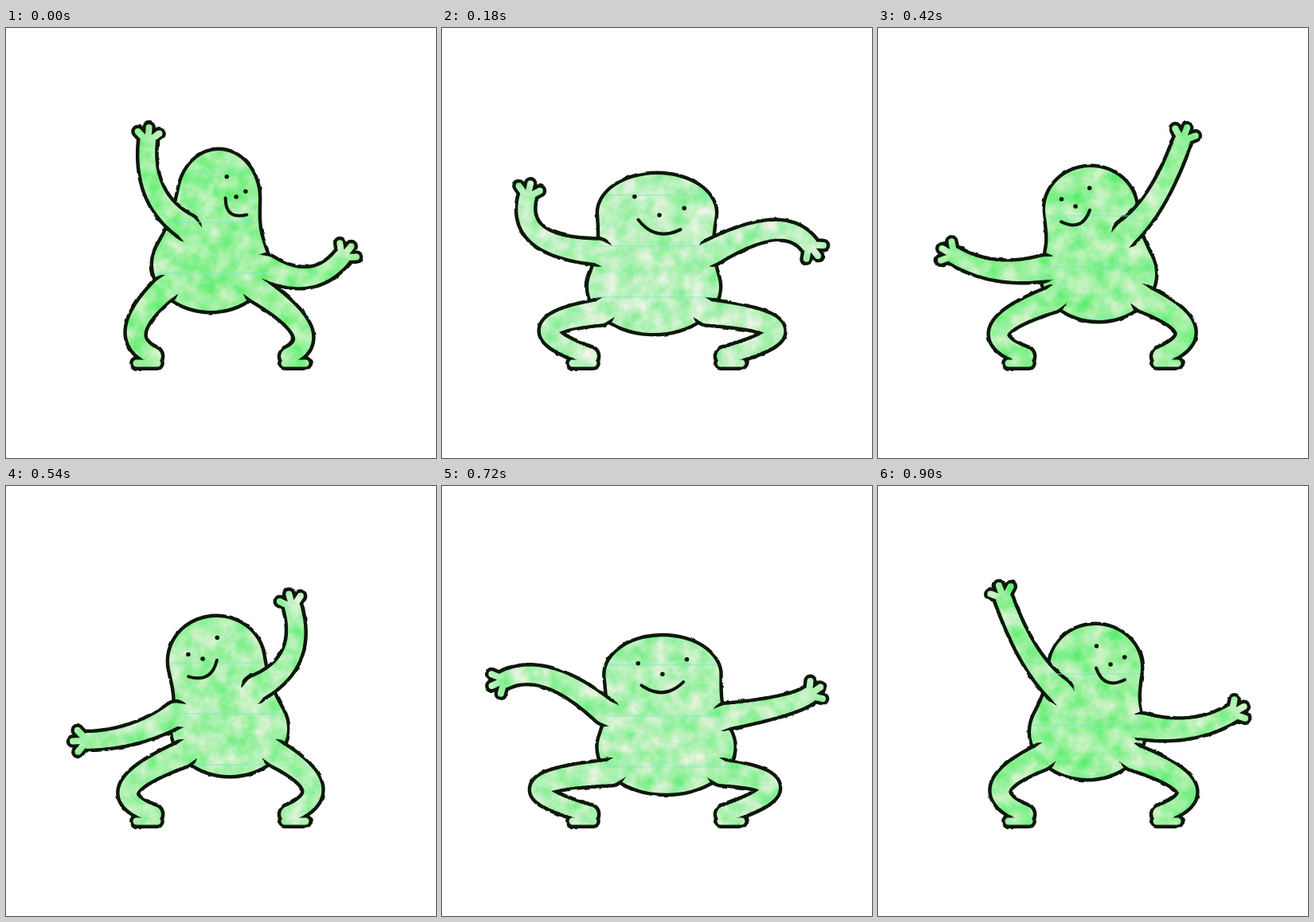
These frames come from a looping animation (540x540 px, 0.96 s). An HTML page:

```html
<!DOCTYPE html>
<html lang="en">
<head>
<meta charset="utf-8">
<title>Dancing blob</title>
<style>
  html, body { margin: 0; width: 100%; height: 100%; overflow: hidden; background: #fff; }
  svg { display: block; width: 100vw; height: 100vh; }
  .ink { fill: #0d180b; }
  .pen { fill: none; stroke: #0d180b; stroke-linecap: round; }
</style>
</head>
<body>
<svg viewBox="0 0 540 540">
  <defs>
    <filter id="marker" filterUnits="userSpaceOnUse" x="0" y="0" width="540" height="540" color-interpolation-filters="sRGB">
      <feTurbulence id="grain" type="fractalNoise" baseFrequency=".045" numOctaves="5"/>
      <feColorMatrix id="tint"/>
      <feComposite in2="SourceAlpha" operator="in"/>
    </filter>
    <filter id="rough" filterUnits="userSpaceOnUse" x="0" y="0" width="540" height="540" color-interpolation-filters="sRGB">
      <feTurbulence type="fractalNoise" baseFrequency=".08" numOctaves="2" result="noise"/>
      <feDisplacementMap in="SourceGraphic" in2="noise" scale="3" xChannelSelector="R" yChannelSelector="G"/>
    </filter>
    <clipPath id="inside"><path id="bodyClip"/></clipPath>
  </defs>
  <path id="bodyInk" class="ink" filter="url(#rough)"/>
  <path id="bodyFill" filter="url(#marker)"/>
  <path id="limbInk" class="ink" filter="url(#rough)"/>
  <path id="limbFill" filter="url(#marker)"/>
  <path id="rules" clip-path="url(#inside)" stroke="#7fe6cf" stroke-width="2" opacity=".45"/>
  <path id="smile" class="pen" stroke-width="4"/>
  <path id="dots" class="pen" stroke-width="5.5"/>
</svg>
<script>
const INK = 4.4, FOOT_Y = 421;
const $ = id => document.getElementById(id);

// head: x, y, rx, ry   belly: x, y, rx   face: x, y, tilt in degrees, half eye distance
// arms: shoulder, elbow, wrist   knees: left x, right x   paper: lightness, first ruled line
const reach = {
  head: [267, 214, 52, 62], belly: [257, 297, 74], face: [289, 196, 38, 15],
  armL: [227, 250, 187, 206, 178, 143], armR: [327, 301, 380, 313, 422, 288],
  knees: [163, 371], paper: [.25, 180]
};
const wave = {
  head: [264, 220, 61, 57], belly: [281, 305, 74], face: [247, 201, -30, 21],
  armL: [213, 287, 160, 311, 102, 320], armR: [314, 254, 358, 213, 360, 153],
  knees: [155, 385], paper: [.31, 222]
};
const squat = {
  head: [270, 232, 75, 50], belly: [266, 325, 84], face: [273, 219, 13, 32],
  armL: [196, 281, 122, 261, 107, 213], armR: [340, 281, 415, 254, 461, 272],
  knees: [135, 418], paper: [.37, 210]
};
const spread = {
  head: [258, 239, 69, 51], belly: [253, 326, 87], face: [255, 218, -4, 27],
  armL: [177, 295, 120, 288, 65, 303], armR: [328, 283, 385, 233, 450, 212],
  knees: [127, 408], paper: [.3, 240]
};
const point = {
  head: [273, 228, 59, 55], belly: [263, 309, 73], face: [292, 208, 22, 19],
  armL: [228, 257, 190, 211, 158, 142], armR: [333, 302, 392, 304, 444, 286],
  knees: [154, 387], paper: [.27, 236]
};

const flipX = ([x, ...rest]) => [540 - x, ...rest];
const flipArm = arm => arm.map((v, i) => i % 2 ? v : 540 - v);
function mirror(p) {
  const [x, y, tilt, half] = p.face;
  return {
    head: flipX(p.head), belly: flipX(p.belly), face: [540 - x, y, -tilt, half],
    armL: flipArm(p.armR), armR: flipArm(p.armL),
    knees: [540 - p.knees[1], 540 - p.knees[0]], paper: p.paper
  };
}

// Halfway between b and c on a cubic through four poses.
function between(a, b, c, d) {
  const mid = {};
  for (const key in b)
    mid[key] = b[key].map((v, i) => (9 * (v + c[key][i]) - a[key][i] - d[key][i]) / 16);
  return mid;
}

const waveL = mirror(wave), pointR = mirror(point);
const half = [
  reach, waveL, between(point, waveL, squat, spread), squat,
  between(waveL, squat, spread, pointR), spread, between(squat, spread, pointR, wave), pointR
];
const dance = [...half, ...half.map(mirror)];

const lerp = (a, b, t) => a + (b - a) * t;
const oval = (x, y, rx, ry = rx) =>
  `M${x - rx},${y}a${rx},${ry} 0 1 0 ${2 * rx},0a${rx},${ry} 0 1 0 ${-2 * rx},0`;

// Joins n + 1 ovals, each given by shape(t), into one blob.
const sweep = (n, shape) =>
  Array.from({ length: n + 1 }, (_, i) => oval(...shape(i / n))).join('');
const bar = (x1, y1, x2, y2, r) => sweep(10, t => [lerp(x1, x2, t), lerp(y1, y2, t), r]);

function torso({ head, belly }, grow) {
  const [x, y, rx, ry] = head;
  return sweep(24, t => {
    const waist = 1 - .08 * Math.sin(Math.PI * t);
    return [lerp(x, belly[0], t), lerp(y, belly[1], t),
      lerp(rx, belly[2], t) * waist - 2 + grow, lerp(ry, 60, t) - 2 + grow];
  });
}

// Tapering parabola through three joints.
const limb = ([ax, ay, bx, by, cx, cy], grow) => sweep(44, t => {
  const a = (1 - t) * (1 - 2 * t), b = 4 * t * (1 - t), c = t * (2 * t - 1);
  return [a * ax + b * bx + c * cx, a * ay + b * by + c * cy, 10 + 4.5 * (1 - t) ** 2 + grow];
});

function arm(joints, grow) {
  const [ax, ay, bx, by, x, y] = joints;
  const aim = Math.atan2(1.5 * y - 2 * by + ay / 2, 1.5 * x - 2 * bx + ax / 2);
  const fingers = [-.85, 0, .85].map(turn => {
    const [dx, dy] = [Math.cos(aim + turn), Math.sin(aim + turn)];
    return bar(x + 6 * dx, y + 6 * dy, x + 18 * dx, y + 18 * dy, 4 + grow);
  });
  return limb(joints, grow) + fingers.join('');
}

function leg([x, y, rx], knee, side, grow) {
  const heel = 270 + side * 80;
  return limb([x + side * rx * .8, y + 32, knee, 379, 270 + side * 85, 412], grow) +
    bar(heel, FOOT_Y, heel + side * 26, FOOT_Y, 4.5 + grow);
}

const limbs = (p, grow) => arm(p.armL, grow) + arm(p.armR, grow) +
  leg(p.belly, p.knees[0], -1, grow) + leg(p.belly, p.knees[1], 1, grow);

// Fill that reaches further into the body than the ink, so joints stay open.
const roots = p => [p.armL, p.armR, ...[-1, 1].map(s => [p.belly[0] + s * p.belly[2] * .8, p.belly[1] + 32])]
  .map(([x, y]) => {
    const [dx, dy] = [p.belly[0] - x, p.belly[1] - 10 - y];
    const k = 10 / Math.hypot(dx, dy);
    return bar(x, y, x + dx * k, y + dy * k, 14.5);
  }).join('');

function draw(step) {
  const p = dance[step];
  const set = (id, d) => $(id).setAttribute('d', d);
  const body = torso(p, 0);
  set('bodyInk', torso(p, INK));
  set('bodyFill', body);
  set('bodyClip', body);
  set('limbInk', limbs(p, INK));
  set('limbFill', limbs(p, 0) + roots(p));

  const [x, y, tilt, eye] = p.face;
  const [cos, sin] = [Math.cos(tilt * Math.PI / 180), Math.sin(tilt * Math.PI / 180)];
  const along = (cy, d) => [x + d * cos, cy + d * sin];
  const grin = 8 + eye * .6, mouth = y + 28;
  set('dots', [along(y, -eye), [x, y + 16], along(y, eye)].map(d => `M${d}h.1`).join(''));
  set('smile', `M${along(mouth, -grin)}Q${x - 22 * sin},${mouth + 22 * cos} ${along(mouth, grin)}`);

  const [light, rule] = p.paper;
  set('rules', [0, 64, 128].map(dy => `M0,${rule + dy}H540`).join(''));
  $('grain').setAttribute('seed', step % 8 + 1);
  $('tint').setAttribute('values',
    `.7 0 0 0 ${light} .03 0 0 0 .93 .55 0 0 0 ${light + .09} 0 0 0 0 1`);
}

let shown = -1;
function tick(now) {
  const step = Math.floor(now / 60) % dance.length;
  if (step !== shown) draw(shown = step);
  requestAnimationFrame(tick);
}
draw(0);
requestAnimationFrame(tick);
</script>
</body>
</html>
```
